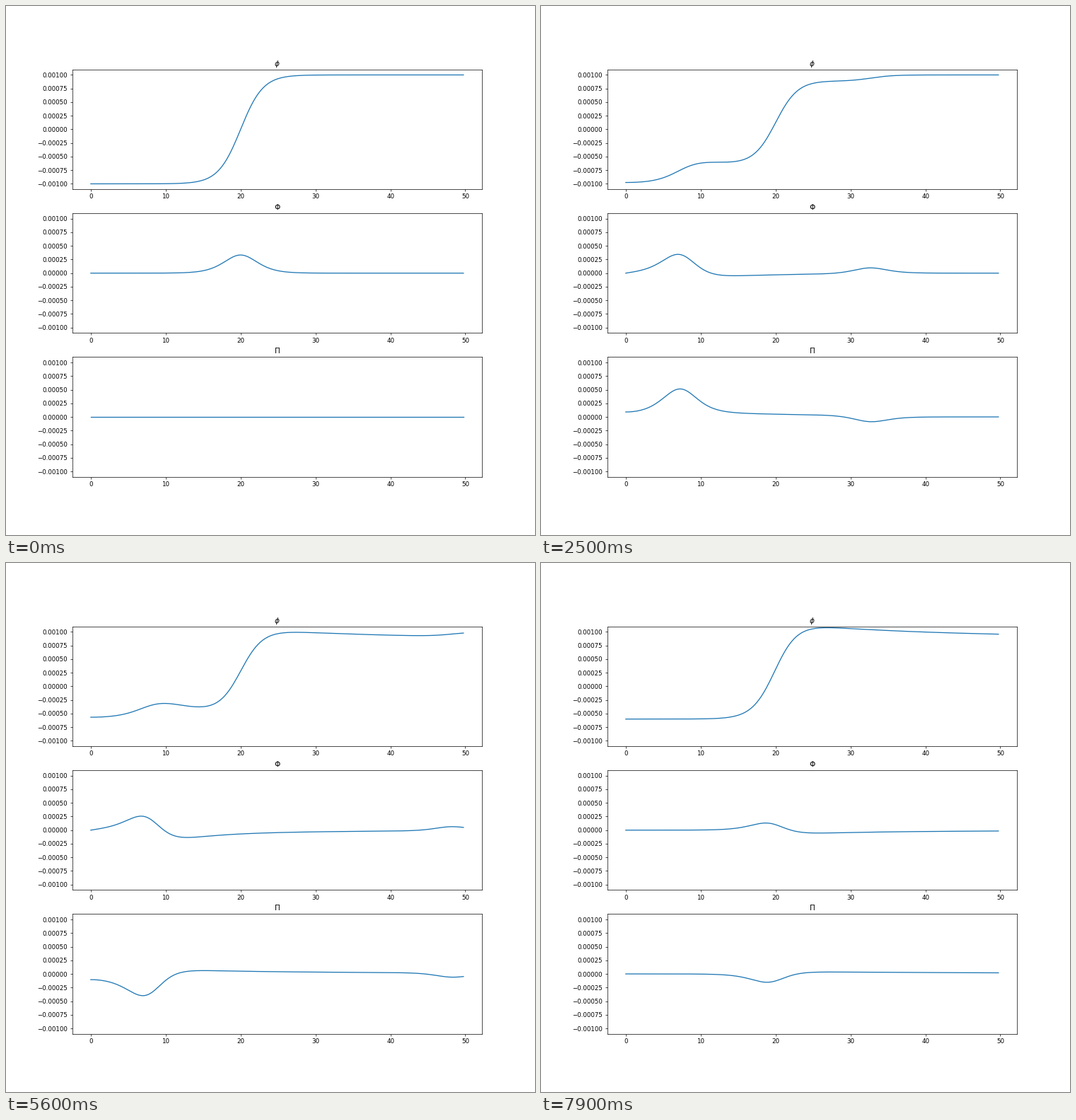
These frames come from a looping animation (748x748 px, 8000 ms). A matplotlib script:

```python
import numpy as np
import matplotlib.pyplot as plt
from matplotlib.animation import FuncAnimation
from matplotlib.ticker import MultipleLocator

AMP, CENTER, WIDTH = 1e-3, 20, 3
FRAMES, INTERVAL, DT = 80, 100, 0.5
COUPLING = 0.2  # share of the field's change that the top panel shows

r = np.arange(0, 50, 0.25)
rs = np.maximum(r, 1e-3)  # keeps 1/r finite at the origin


def profile(x):
    return AMP * np.tanh((np.abs(x) - CENTER) / WIDTH)


def wave(x):
    return x * profile(x)


def wave_slope(x):
    u = (np.abs(x) - CENTER) / WIDTH
    return profile(x) + np.abs(x) * AMP / WIDTH / np.cosh(u) ** 2


def fields(t):
    """Spherical wave equation from rest, solved by d'Alembert's formula."""
    out, inc = rs - t, rs + t
    field = (wave(inc) + wave(out)) / (2 * rs)
    grad = (wave_slope(inc) + wave_slope(out)) / (2 * rs) - field / rs
    rate = (wave_slope(inc) - wave_slope(out)) / (2 * rs)
    start = profile(r)
    return start + COUPLING * (field - start), grad, rate


fig, axes = plt.subplots(3, 1, figsize=(12, 12), dpi=748 / 12)
lines = []
for ax, title, y in zip(axes, (r"$\phi$", r"$\Phi$", r"$\Pi$"), fields(0)):
    lines += ax.plot(r, y)
    ax.set_title(title)
    ax.set_ylim(-1.1 * AMP, 1.1 * AMP)
    ax.xaxis.set_major_locator(MultipleLocator(10))
    ax.yaxis.set_major_locator(MultipleLocator(AMP / 4))


def update(i):
    for line, y in zip(lines, fields(i * DT)):
        line.set_ydata(y)
    return lines


anim = FuncAnimation(fig, update, frames=FRAMES, interval=INTERVAL,
                     repeat=True, repeat_delay=0)
plt.show()
```
